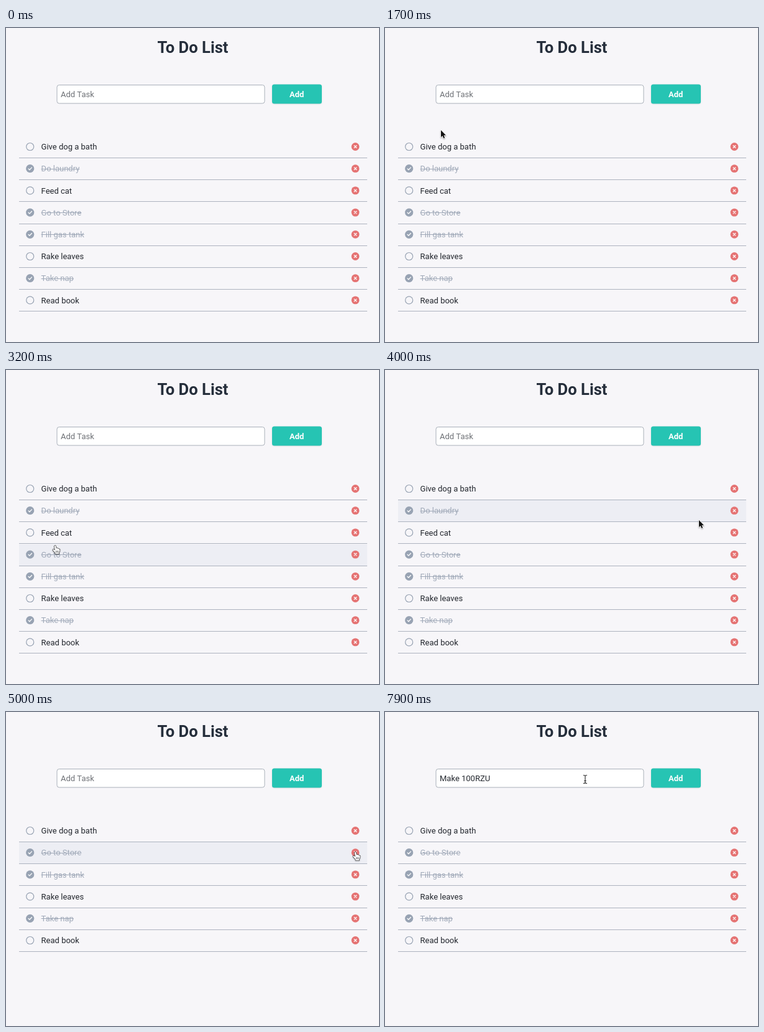
Write an HTML page with a canvas that moves like this. It is 600 by 504 pixels and loops after 8 s.

```html
<!DOCTYPE html>
<html lang="en">
<head>
<meta charset="utf-8">
<title>To Do List</title>
<style>
  html, body { margin: 0; width: 100%; height: 100%; overflow: hidden; background: #f7f6f9; }
  canvas { display: block; width: 600px; height: 504px; }
</style>
</head>
<body>
<canvas id="stage" width="600" height="504"></canvas>
<script>
const ctx = document.getElementById('stage').getContext('2d');
const LOOP = 8000, STEP = 100;
const LIST = { left: 21, right: 581, top: 173.2, pitch: 35.2 };
const INPUT = { x: 82, y: 91.5, w: 334, h: 29.5 };
const COLOR = {
  page: '#f7f6f9', hover: '#edeef4', line: '#adb3bf', text: '#23272e',
  done: '#a1aab9', ring: '#98a3b3', remove: '#e57373', button: '#26c4b3'
};

// checked: [from, to] spans; removed: time of deletion
const TASKS = [
  { label: 'Give dog a bath', checked: [2200, 2900] },
  { label: 'Do laundry', checked: [0, LOOP], removed: 4500 },
  { label: 'Feed cat', checked: [3400, 3700], removed: 5000 },
  { label: 'Go to Store', checked: [0, LOOP] },
  { label: 'Fill gas tank', checked: [0, LOOP] },
  { label: 'Rake leaves' },
  { label: 'Take nap', checked: [0, LOOP] },
  { label: 'Read book' }
];

// pointer path: time, x, y
const PATH = [
  [100, 430, 36], [400, 392, 150], [700, 363, 244], [900, 298, 474],
  [1000, 286, 458], [1100, 274, 404], [1400, 180, 250], [1600, 108, 172],
  [1700, 90, 164], [1800, 84, 176], [1900, 81, 187], [2900, 81, 187],
  [3200, 79, 282], [3400, 76, 262], [3800, 76, 262], [3900, 230, 258],
  [4000, 505, 241], [4200, 562, 225], [5000, 562, 225], [5100, 535, 214],
  [5300, 320, 132], [5500, 228, 113], [5600, 225, 113], [7800, 225, 113],
  [7900, 322, 108]
];

const TYPED = 'Make 100RZU';
const KEYS = [6200, 6300, 6400, 6500, 6600, 6700, 6750, 6800, 7300, 7400, 7500];
const FOCUS = 5500, BLINK = 400;

const within = (t, span) => !!span && t >= span[0] && t < span[1];

function pointerAt(t) {
  if (t < PATH[0][0] || (t >= KEYS[0] && t < 7800)) return null;
  const i = PATH.findIndex(p => p[0] > t);
  if (i < 0) return { x: PATH.at(-1)[1], y: PATH.at(-1)[2] };
  const [t0, x0, y0] = PATH[i - 1], [t1, x1, y1] = PATH[i];
  const k = (t - t0) / (t1 - t0);
  return { x: x0 + (x1 - x0) * k, y: y0 + (y1 - y0) * k };
}

function write(text, x, y, color, font = '13px', align = 'left') {
  ctx.font = font + ' Roboto, sans-serif';
  ctx.textAlign = align;
  ctx.fillStyle = color;
  ctx.fillText(text, x, y);
}

function roundBox(x, y, w, h, fill, stroke) {
  ctx.beginPath();
  ctx.roundRect(x, y, w, h, 3.5);
  ctx.fillStyle = fill;
  ctx.fill();
  if (stroke) {
    ctx.strokeStyle = stroke;
    ctx.lineWidth = 1;
    ctx.stroke();
  }
}

function disc(x, y, r, color) {
  ctx.beginPath();
  ctx.arc(x, y, r, 0, Math.PI * 2);
  ctx.fillStyle = color;
  ctx.fill();
}

function strokePath(d, x, y, color, width) {
  ctx.save();
  ctx.translate(x, y);
  ctx.strokeStyle = color;
  ctx.lineWidth = width;
  ctx.lineCap = ctx.lineJoin = 'round';
  ctx.stroke(new Path2D(d));
  ctx.restore();
}

function drawHeader(t) {
  write('To Do List', 300.5, 40, '#252e3b', 'bold 25.6px', 'center');
  roundBox(INPUT.x, INPUT.y, INPUT.w, INPUT.h, '#fff', '#a9b0b9');

  ctx.save();
  ctx.shadowColor = 'rgba(0,0,0,.15)';
  ctx.shadowBlur = 2;
  ctx.shadowOffsetY = 0.5;
  roundBox(428, 90.5, 80, 31, COLOR.button);
  ctx.restore();
  write('Add', 467.7, 110.5, '#fff', 'bold 13px', 'center');

  const count = KEYS.filter(k => t >= k).length;
  const text = TYPED.slice(0, count);
  if (count) write(text, 88, 110.5, COLOR.text);
  else write('Add Task', 88, 110.5, '#6f7277');

  const lastAction = count ? KEYS[count - 1] : FOCUS;
  if (t >= FOCUS && t - lastAction < BLINK) {
    ctx.font = '13px Roboto, sans-serif';
    ctx.fillStyle = '#111';
    ctx.fillRect(88 + ctx.measureText(text).width, 98, 1, 16);
  }
}

function drawRow(task, i, t, hovered) {
  const y = 190.5 + LIST.pitch * i;
  const lineY = Math.floor(208.4 + LIST.pitch * i);
  const done = within(t, task.checked);
  const width = LIST.right - LIST.left;

  if (hovered) {
    const top = lineY - 34;
    ctx.fillStyle = COLOR.hover;
    ctx.fillRect(LIST.left, top, width, lineY - top);
  }
  ctx.fillStyle = COLOR.line;
  ctx.fillRect(LIST.left, lineY, width, 1);

  if (done) {
    disc(38.7, y, 6.6, COLOR.ring);
    strokePath('M-2.6 .2 L-.8 2 L2.8 -1.8', 38.7, y, '#fff', 1.3);
  } else {
    disc(38.7, y, 6.6, COLOR.ring);
    disc(38.7, y, 5.4, hovered ? COLOR.hover : COLOR.page);
  }

  write(task.label, 56.6, Math.round(y + 4.6), done ? COLOR.done : COLOR.text);
  if (done) ctx.fillRect(56.6, Math.round(y), ctx.measureText(task.label).width, 1);

  disc(562, y, 6.4, COLOR.remove);
  strokePath('M-1.8 -1.8 L1.8 1.8 M1.8 -1.8 L-1.8 1.8', 562, y, '#fff', 1.3);
}

const ARROW = new Path2D('M0 0 V11.2 L2.5 8.9 L4.3 13 L6.2 12.2 L4.5 8.2 H8 Z');
const HAND = new Path2D('M-1.2 .8 Q0 -1.2 1.2 .8 L1.8 4.2 Q3 3.2 3.9 4.5 Q5.2 3.8 6 5.2 ' +
  'Q7.6 5 7.7 6.8 Q7.7 9.5 6.3 11 V13 H.3 V11.6 L-3.7 7.3 Q-4 5.4 -2 6 L-.2 7.2 Z');

function drawPointer({ x, y }, kind) {
  ctx.save();
  ctx.translate(x, y);
  if (kind === 'text') {
    strokePath('M-2.6 -6.5 Q0 -6.5 0 -5 V5 Q0 6.5 -2.6 6.5 M2.6 -6.5 Q0 -6.5 0 -5 M0 5 Q0 6.5 2.6 6.5 M-1.3 2.5 H1.3',
      0, 0, '#222', 1.1);
  } else {
    const shape = kind === 'hand' ? HAND : ARROW;
    ctx.save();
    ctx.shadowColor = 'rgba(0,0,0,.35)';
    ctx.shadowBlur = 2;
    ctx.shadowOffsetY = 1;
    ctx.lineJoin = 'round';
    ctx.lineWidth = kind === 'hand' ? 1.1 : 1.5;
    ctx.strokeStyle = kind === 'hand' ? '#111' : '#fff';
    ctx.stroke(shape);
    ctx.restore();
    ctx.fillStyle = kind === 'hand' ? '#fff' : '#111';
    ctx.fill(shape);
    if (kind === 'hand') strokePath('M1.5 8.3 V11 M3.3 8.3 V11 M5 8.3 V11', 0, 0, '#222', 0.6);
  }
  ctx.restore();
}

function pointerKind({ x, y }, task) {
  if (x > INPUT.x && x < INPUT.x + INPUT.w && y > INPUT.y && y < INPUT.y + INPUT.h) return 'text';
  if (x > 428 && x < 508 && y > 90 && y < 122) return 'hand';
  if (!task) return 'arrow';
  ctx.font = '13px Roboto, sans-serif';
  const labelEnd = 56.6 + ctx.measureText(task.label).width;
  return (x > 32 && x < labelEnd) || (x > 555 && x < 569) ? 'hand' : 'arrow';
}

function draw(t) {
  ctx.fillStyle = COLOR.page;
  ctx.fillRect(0, 0, 600, 504);
  drawHeader(t);

  const rows = TASKS.filter(task => !(t >= task.removed));
  const pointer = pointerAt(t);
  const inside = pointer && pointer.x >= LIST.left && pointer.x <= LIST.right;
  const active = inside ? Math.floor((pointer.y - LIST.top) / LIST.pitch) : -1;
  rows.forEach((task, i) => drawRow(task, i, t, i === active));
  if (pointer) drawPointer(pointer, pointerKind(pointer, rows[active]));
}

function tick() {
  const t = performance.now() % LOOP;
  draw(Math.floor(t / STEP) * STEP);
  requestAnimationFrame(tick);
}
tick();
</script>
</body>
</html>
```
